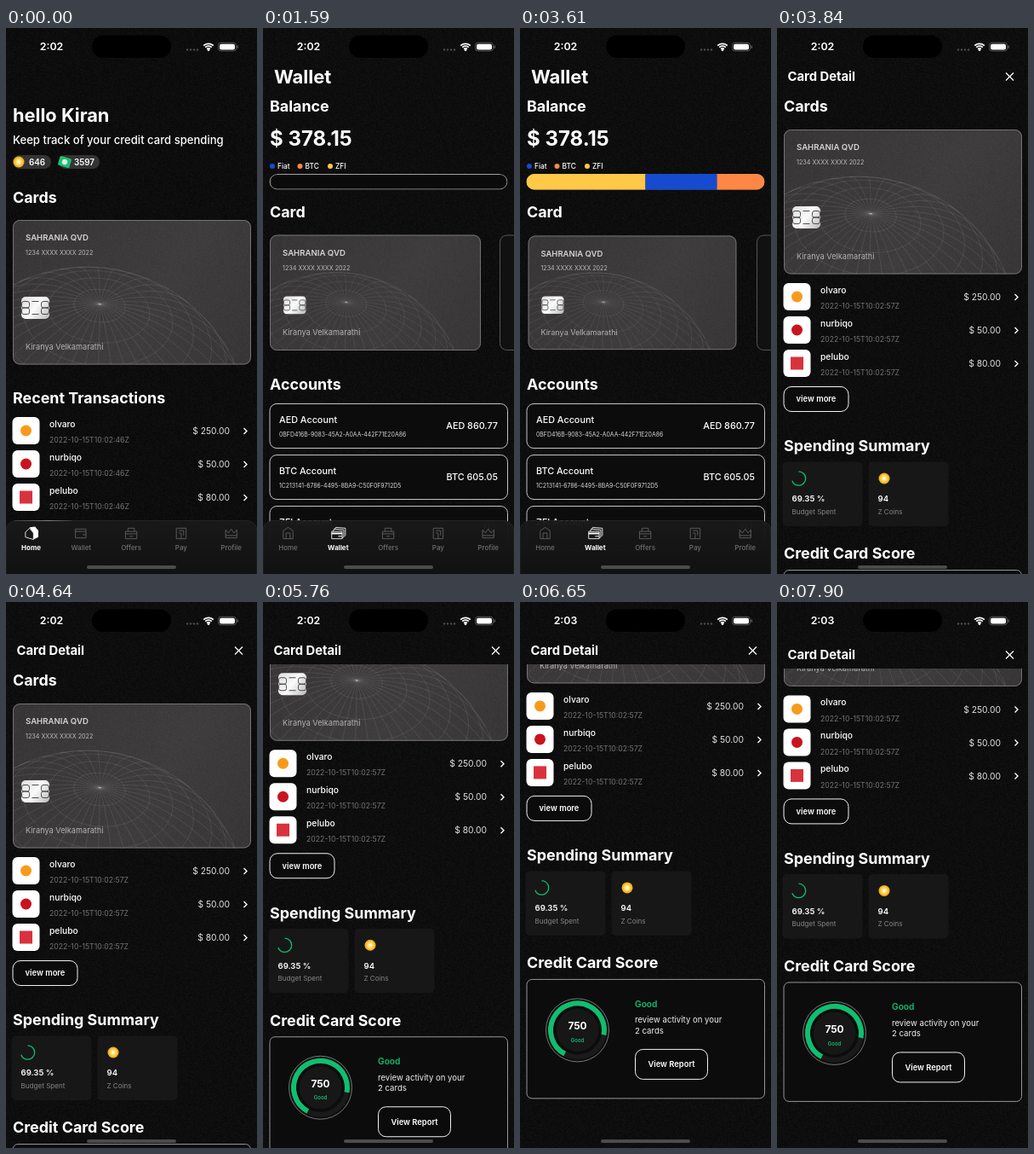
An HTML page with a canvas that plays this animation: 295 px wide and 640 px high, repeating every 8 s.

```html
<!DOCTYPE html>
<html lang="en">
<head>
<meta charset="utf-8">
<title>Card wallet</title>
<style>
html, body { margin: 0; width: 100%; height: 100%; overflow: hidden; background: #0c0c0c; }
canvas { display: block; width: 100vw; height: 100vh; }
</style>
</head>
<body>
<canvas id="stage"></canvas>
<script>
const W = 295, H = 640, LOOP = 8000, TICK = 110;
const canvas = document.getElementById('stage');
const dpr = window.devicePixelRatio || 1;
canvas.width = W * dpr;
canvas.height = H * dpr;
const c = canvas.getContext('2d');

const GREEN = '#0fbf70', BLUE = '#174bcf', ORANGE = '#ff8746', YELLOW = '#ffc846';
const OWNER = 'Kiranya Velkamarathi', BANK = 'SAHRANIA QVD';
const SHOPS = [
  ['olvaro', '$ 250.00', '#f79a1c'],
  ['nurbiqo', '$ 50.00', '#c9131e'],
  ['pelubo', '$ 80.00', '#d8323f']
];
const ACCOUNTS = [
  ['AED', '860.77', '0BFD416B-9083-45A2-A0AA-442F71E20A86'],
  ['BTC', '605.05', '1C213141-6786-4495-8BA9-C50F0F9712D5'],
  ['ZFI', '', '']
];

// ---- helpers ----
function text(str, x, y, size, weight = 400, color = '#fff', align = 'left') {
  c.font = `${weight} ${size}px Inter, "Open Sans", sans-serif`;
  c.fillStyle = color;
  c.textAlign = align;
  c.fillText(str, x, y + size * 0.36);
}
const title = (str, y) => text(str, 8, y, 17.9, 700);

function box(x, y, w, h, r, fill, stroke, lw = 1) {
  c.beginPath();
  c.roundRect(x, y, w, h, r);
  if (fill) { c.fillStyle = fill; c.fill(); }
  if (stroke) { c.strokeStyle = stroke; c.lineWidth = lw; c.stroke(); }
}

function disc(x, y, r, fill) {
  c.beginPath();
  c.arc(x, y, r, 0, Math.PI * 2);
  c.fillStyle = fill;
  c.fill();
}

function arc(x, y, r, from, to, color, lw) {
  c.beginPath();
  c.arc(x, y, r, from * Math.PI / 180, to * Math.PI / 180);
  c.strokeStyle = color;
  c.lineWidth = lw;
  c.stroke();
}

function line(color, lw, ...pts) {
  c.beginPath();
  for (let i = 0; i < pts.length; i += 2) c.lineTo(pts[i], pts[i + 1]);
  c.strokeStyle = color;
  c.lineWidth = lw;
  c.stroke();
}

function at(x, y, draw, scale = 1) {
  c.save();
  c.translate(x, y);
  c.scale(scale, scale);
  draw();
  c.restore();
}

const clamp = v => Math.max(0, Math.min(1, v));
const held = (t, from) => Math.floor((t - from) / TICK) * TICK;

// ---- background grain ----
const grain = (() => {
  const n = 128, tile = document.createElement('canvas');
  tile.width = tile.height = n;
  const g = tile.getContext('2d'), img = g.createImageData(n, n);
  let seed = 7;
  for (let i = 0; i < n * n; i++) {
    seed = (seed * 1664525 + 1013904223) % 4294967296;
    img.data.fill(255, i * 4, i * 4 + 3);
    img.data[i * 4 + 3] = seed / 4294967296 * 9;
  }
  g.putImageData(img, 0, 0);
  return c.createPattern(tile, 'repeat');
})();

function backdrop(x, y, w, h) {
  c.fillStyle = '#090909';
  c.fillRect(x, y, w, h);
  c.fillStyle = grain;
  c.fillRect(x, y, w, h);
}

// ---- globe: a tilted sphere of meridians and parallels ----
const globe = (() => {
  const path = new Path2D(), R = 190, ox = 87, oy = 245;
  const pole = [0.08, -0.77, 0.633];
  const u = [0.997, 0.062, -0.05];
  const v = [0, 1, 2].map(i => {
    const j = (i + 1) % 3, k = (i + 2) % 3;
    return pole[j] * u[k] - pole[k] * u[j];
  });
  const curve = fn => {
    let pen = false;
    for (let i = 0; i <= 72; i++) {
      const [lat, lon] = fn(i / 72);
      const a = Math.sin(lat) * Math.cos(lon), b = Math.sin(lat) * Math.sin(lon), d = Math.cos(lat);
      const [x, y, z] = [0, 1, 2].map(k => a * u[k] + b * v[k] + d * pole[k]);
      if (z < 0) { pen = false; continue; }
      path[pen ? 'lineTo' : 'moveTo'](ox + x * R, oy + y * R);
      pen = true;
    }
  };
  for (let i = 0; i < 36; i++) curve(s => [s * 2, i * Math.PI / 18]);
  for (let i = 1; i < 12; i++) curve(s => [i * 0.16, s * Math.PI * 2]);
  path.moveTo(ox + R, oy);
  path.arc(ox, oy, R, 0, Math.PI * 2);
  return path;
})();

function chip() {
  const g = c.createLinearGradient(0, 0, 34, 26);
  g.addColorStop(0, '#dcdcdc');
  g.addColorStop(0.5, '#fafafa');
  g.addColorStop(1, '#b8b8b8');
  box(0.5, 0, 33, 26, 5, g);
  const ink = '#3c3c3c';
  for (const x of [1, 24]) {
    box(x, 5.5, 9, 7.5, 2.5, null, ink, 0.9);
    box(x, 13, 9, 7.5, 2.5, null, ink, 0.9);
  }
  for (const y of [5.5, 20.5]) line(ink, 0.9, 13, y, 21, y);
}

function card(w, h, art, shift) {
  const g = c.createLinearGradient(0, 0, w, h);
  g.addColorStop(0, '#343233');
  g.addColorStop(0.6, '#3b393a');
  g.addColorStop(1, '#343233');
  c.save();
  box(0, 0, w, h, 8, g);
  c.clip();
  c.fillStyle = grain;
  c.fillRect(0, 0, w, h);
  at(shift, 0, () => {
    c.strokeStyle = 'rgba(255,255,255,.11)';
    c.lineWidth = 0.8;
    c.stroke(globe);
    at(9.5, 90, chip);
  }, art);
  c.restore();
  box(0.5, 0.5, w - 1, h - 1, 8, null, '#757374');
  text(BANK, 15, 21, 9.6, 600, '#d4d2d3');
  text('1234 XXXX XXXX 2022', 15, 38.5, 7.2, 400, '#bdbbbc');
  text(OWNER, 15, h - 21, 9.2, 400, '#b4b2b3');
}

function coin(x, y) {
  disc(x, y, 6.5, '#f6b21f');
  disc(x, y, 4.4, '#ffd75a');
  disc(x, y, 2.2, '#fff3cd');
}

function shopList(y, stamp) {
  SHOPS.forEach(([name, price, color], i) => {
    const top = y + i * 39;
    box(7.5, top, 32, 32, 6, '#fff');
    if (i === 2) box(16, top + 8.5, 15, 15, 0, color);
    else disc(23.5, top + 16, 6.5, color);
    text(name, 51, top + 8, 10.3, 500);
    text(stamp, 51, top + 27, 8.7, 400, '#737373');
    text(price, 263, top + 16.5, 10.3, 400, '#e2e2e2', 'right');
    line('#fff', 1.4, 279.5, top + 13, 283, top + 16.5, 279.5, top + 20);
  });
}

function button(label, x, y, w, h) {
  box(x + 0.5, y + 0.5, w - 1, h - 1, 9, '#0b0b0b', '#f2f2f2');
  text(label, x + w / 2, y + h / 2, 9.4, 600, '#fff', 'center');
}

// ---- tab bar ----
const ICONS = {
  Home: 'M-6 7V-3L0-7 6-3V7ZM-2.5 7V0H2.5V7',
  Wallet: 'M-7-5H6V6H-7ZM-7-2H6M2 2H6',
  Offers: 'M-7-2H7V7H-7ZM-4-2V-6H4V-2M-7 1H7M-2 4H2',
  Pay: 'M-6-6H6V7H-6ZM-3-3H3V3M-3 0H0V7',
  Profile: 'M-7-4L-3.5 0 0-5 3.5 0 7-4V6H-7ZM-7 3H7'
};

function activeIcon(name) {
  if (name === 'Home') {
    c.stroke(new Path2D('M-7-1L-2-6 3 0V8L-7 5Z'));
    c.fillStyle = '#fff';
    c.fill(new Path2D('M-2-7L5-8 9-3V5L3 8V0Z'));
  } else {
    c.stroke(new Path2D('M-4-5L-3-7 9-6 9 3 8 4M-6-2L-5-5 7-4 7 5 5 6'));
    c.stroke(new Path2D('M-8-2H5V7H-8Z'));
    line('#fff', 2, -8, 0.5, 5, 0.5);
    line('#fff', 1, 0, 4, 5, 4);
  }
}

function tabBar(active) {
  const g = c.createLinearGradient(0, 577, 0, H);
  g.addColorStop(0, 'rgba(25,25,25,.97)');
  g.addColorStop(1, '#111');
  box(0, 577.5, W, 75, 12, g, '#292929', 0.8);
  if (active === 'Home') {
    const glow = c.createLinearGradient(8, 0, 78, 0);
    glow.addColorStop(0, 'rgba(255,255,255,.1)');
    glow.addColorStop(0.6, 'rgba(255,255,255,.4)');
    glow.addColorStop(1, 'rgba(255,255,255,.1)');
    line(glow, 1, 10, 577.5, 77, 577.5);
  }
  Object.keys(ICONS).forEach((name, i) => {
    const x = 29.5 + i * 58.8, on = name === active;
    at(x, 592, () => {
      c.strokeStyle = on ? '#fff' : '#636363';
      c.lineWidth = 0.9;
      if (on) activeIcon(name);
      else c.stroke(new Path2D(ICONS[name]));
    }, 0.95);
    text(name, x, 609, 8, on ? 700 : 500, on ? '#fff' : '#707070', 'center');
  });
}

// ---- screens ----
function home() {
  backdrop(0, 0, W, H);
  text('hello Kiran', 8, 102, 21.8, 700);
  text('Keep track of your credit card spending', 8, 131.5, 13.1, 500);
  box(8, 149, 45, 16, 8, '#343434');
  coin(15, 157);
  text('646', 27, 157, 9.8, 600);
  box(62, 149, 48, 16, 8, '#343434');
  at(69, 157, () => {
    c.rotate(0.3);
    box(-7, -5.5, 14, 11, 1.5, '#20bd72');
    disc(0, 0, 3.2, '#d5f5e4');
  });
  text('3597', 80, 157, 9.8, 600);
  title('Cards', 199);
  at(8, 225, () => card(280, 169.5, 1, 0));
  title('Recent Transactions', 434);
  shopList(456, '2022-10-15T10:02:46Z');
  tabBar('Home');
}

function wallet(fill, pressed) {
  backdrop(0, 0, W, H);
  text('Wallet', 13, 57, 22, 700);
  title('Balance', 92);
  text('$ 378.15', 8, 129, 24, 700);
  [['Fiat', 11, BLUE], ['BTC', 43.5, ORANGE], ['ZFI', 79, YELLOW]].forEach(([name, x, color]) => {
    disc(x, 162, 3, color);
    text(name, x + 6, 162, 8.4, 500);
  });

  c.save();
  box(7.5, 171, 280, 18.5, 9.2);
  c.clip();
  box(8, 171.5, 279, 17.5, 8.7, '#0b0b0b', '#a2a2a2');
  let x = 7.5;
  [[140, YELLOW], [84, BLUE], [56, ORANGE]].forEach(([w, color]) => {
    c.fillStyle = color;
    c.fillRect(x, 171, w * fill, 19);
    x += w * fill;
  });
  c.restore();

  title('Card', 216);
  at(132, 310.25, () => at(-124, -67.75, () => card(248, 135.5, 0.8, 8)), pressed ? 0.987 : 1);
  box(278.5, 243, 60, 134.5, 8, '#111', '#565656');

  title('Accounts', 418);
  ACCOUNTS.forEach(([code, sum, id], i) => {
    const y = 440 + i * 60;
    box(8, y + 0.5, 279.5, 52, 8, '#0c0c0c', '#c4c4c4');
    text(code + ' Account', 19, y + 19, 10.8, 500);
    text(id, 19, y + 37, 6.9, 400, '#d8d8d8');
    text(code + ' ' + sum, 276, y + 26.5, 10.8, 500, '#fff', 'right');
  });
  tabBar('Wallet');
}

function summaryTile(x, value, label) {
  box(x, 508.5, 94, 75.5, 5, '#171717');
  text(value, x + 11, 552, 9.6, 600);
  text(label, x + 11, 567, 8.1, 400, '#858585');
}

function scoreBox() {
  box(8, 635.5, 279.5, 139.5, 6, '#0c0c0c', '#969696');
  arc(67.5, 695, 37, 0, 360, '#858585', 0.9);
  arc(67.5, 695, 31.5, 0, 360, '#1a1a1a', 6);
  arc(67.5, 695, 31.5, 118, 370, GREEN, 6);
  disc(67.5, 695, 25, '#171717');
  text('750', 67.5, 690, 11.9, 700, '#fff', 'center');
  text('Good', 67.5, 707, 6, 600, GREEN, 'center');
  text('Good', 135, 664, 10.2, 600, GREEN);
  text('review activity on your', 135, 683, 9.6, 400, '#f0f0f0');
  text('2 cards', 135, 695.5, 9.6, 400, '#f0f0f0');
  button('View Report', 135, 717, 86, 36);
}

function detail(scroll, drop) {
  c.save();
  c.translate(0, drop);
  backdrop(0, 0, W, H);
  c.beginPath();
  c.rect(0, 73, W, H);
  c.clip();
  c.translate(0, -scroll);
  title('Cards', 92);
  at(8, 119, () => card(280, 169.5, 1, 0));
  shopList(299, '2022-10-15T10:02:57Z');
  button('view more', 7.5, 420, 77, 30);
  title('Spending Summary', 490);
  summaryTile(6.5, '69.35 %', 'Budget Spent');
  arc(25.5, 528, 8.2, -90, 160, GREEN, 1.3);
  summaryTile(107.5, '94', 'Z Coins');
  coin(126, 528);
  title('Credit Card Score', 616);
  scoreBox();
  c.restore();

  at(0, drop, () => {
    text('Card Detail', 12.5, 57, 14.8, 700);
    line('#fff', 1.3, 269, 52.5, 278, 61.5);
    line('#fff', 1.3, 278, 52.5, 269, 61.5);
  });
}

function statusBar(clock) {
  box(101, 8.5, 93, 26.5, 13.2, '#000');
  text(clock, 53.5, 22, 12.4, 600, '#fff', 'center');
  for (let i = 0; i < 4; i++) disc(213 + i * 4, 25.5, 1.2, '#4c4c4c');
  [2.6, 5.6, 8.6].forEach((r, i) => arc(238, 26.5, r - i * 0.2, -135, -45, '#fff', 1.8));
  disc(238, 25.8, 1.4, '#fff');
  box(249.5, 17.3, 21, 9.6, 3.2, null, '#6a6a6a', 0.8);
  box(251, 18.7, 18, 6.8, 2, '#fff');
  box(271.6, 20.3, 1.2, 3.6, 0.6, '#6a6a6a');
}

// ---- timeline ----
function draw(t) {
  c.setTransform(dpr, 0, 0, dpr, 0, 0);
  if (t < 1590) home();
  else if (t < 3840) {
    const p = clamp((held(t, 1590) + 20) / 440);
    wallet(p * p * (3 - 2 * p), t >= 3610);
    if (t >= 3730) detail(0, 250);
  } else {
    // flick with friction
    const scroll = t < 5540 ? 0 : 194.6 * (1 - Math.exp(-(held(t, 5540) + 19) / 230));
    detail(scroll, t < 7780 ? 0 : t < 7900 ? 2 : 5);
  }
  statusBar(t < 6100 ? '2:02' : '2:03');
  box(95, 630, 105, 4, 2, '#4c4c4c');
}

function loop(now) {
  draw(now % LOOP);
  requestAnimationFrame(loop);
}
requestAnimationFrame(loop);
</script>
</body>
</html>
```
